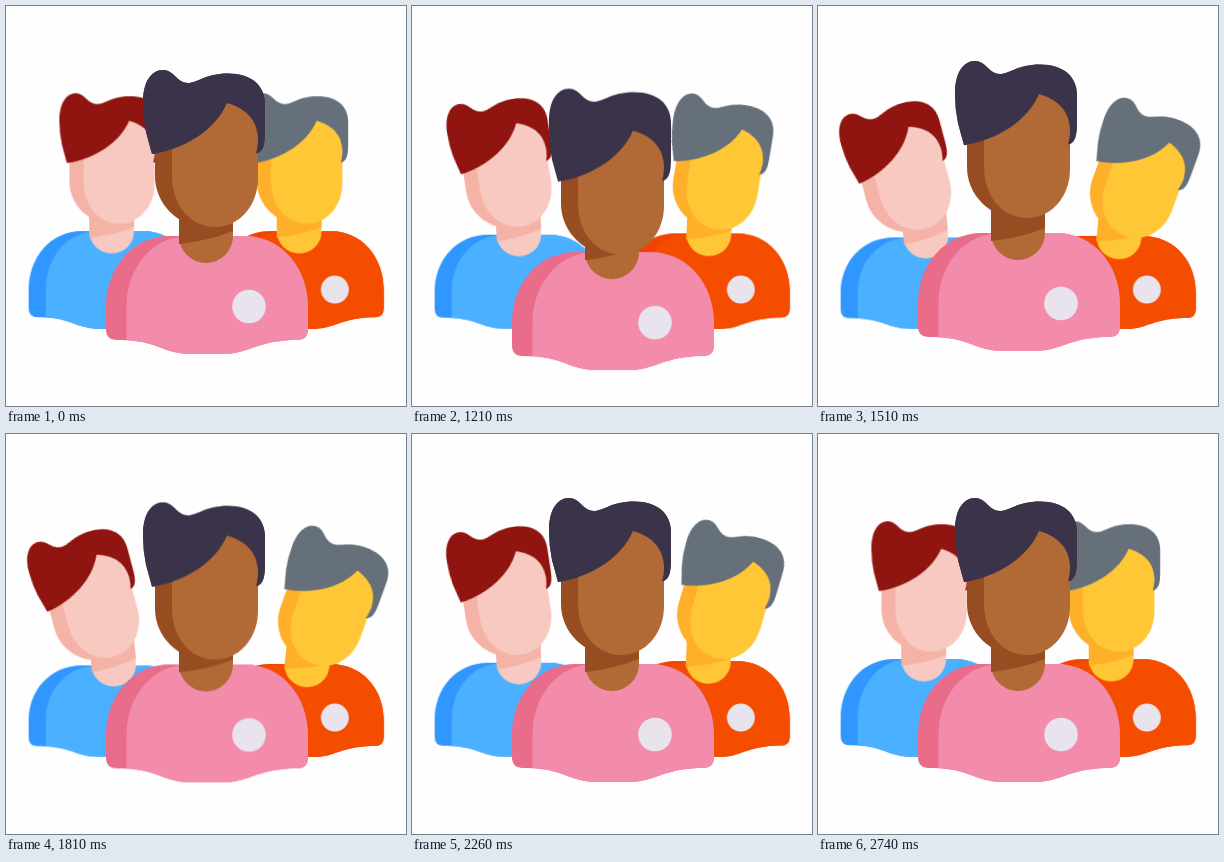
Write an HTML page that moves like this. It is 400 px wide and 400 px high and loops after 2.83 s.

```html
<!DOCTYPE html>
<html lang="en">
<head>
<meta charset="utf-8">
<title>Team</title>
<style>
  html, body { margin: 0; width: 100%; height: 100%; overflow: hidden; background: #fefefe; }
  svg { display: block; width: 100vw; height: 100vh; }

  .left  { --hair: #90140f; --skin: #f8c9c0; --shade: #f4b3a6; --shirt: #4ab0ff; --fold: #2f97ff; }
  .right { --hair: #66707a; --skin: #ffc736; --shade: #ffb02b; --shirt: #f44d00; --fold: #f04400; }
  .front { --hair: #3b3349; --skin: #b16936; --shade: #984c21; --shirt: #f38caa; --fold: #e96c8b; }

  .hair { fill: var(--hair); }
  .skin { fill: var(--skin); }
  .shade { fill: var(--shade); }
  .shirt { fill: var(--shirt); }
  .fold { fill: var(--fold); }
  .badge { fill: #e9e3ee; }

  .move { animation: 2830ms ease-in-out infinite; }
  .sink { transform-origin: 201px 348px; }
  .lean { transform-origin: 200px 230px; }
  .left .sink { animation-name: sink-left; }
  .left .lean { animation-name: lean-left; }
  .left .tilt { animation-name: tilt-left; transform-origin: 229px 250px; }
  .right .sink { animation-name: sink-right; }
  .right .lean { animation-name: lean-right; }
  .right .shift { animation-name: shift-right; }
  .right .tilt { animation-name: tilt-right; transform-origin: 200px 218px; }
  .torso { animation-name: torso; }
  .nod { animation-name: nod; }
  .crown { animation-name: crown; }

  @keyframes sink-left {
    0%, 35.3%, 89%, 100% { transform: scaleY(1); }
    49.1%, 72.4% { transform: scaleY(.935); }
  }
  @keyframes lean-left {
    0%, 35.3%, 89%, 100% { transform: translate(0, 0) rotate(0deg); }
    49.1%, 72.4% { transform: translate(2.5px, 6px) rotate(-5deg); }
  }
  @keyframes tilt-left {
    0%, 35.3%, 89%, 100% { transform: rotate(0deg); }
    49.1%, 72.4% { transform: rotate(-15deg); }
  }
  @keyframes sink-right {
    0%, 35.3%, 87%, 100% { transform: scaleY(1); }
    50.9%, 71% { transform: scaleY(.95); }
  }
  @keyframes lean-right {
    0%, 35.3%, 87%, 100% { transform: translate(0, 0) rotate(0deg); }
    50.9%, 71% { transform: translate(9.5px, 7px) rotate(6deg); }
  }
  @keyframes shift-right {
    0%, 35.3%, 87%, 100% { transform: translate(0, 0); }
    50.9%, 71% { transform: translate(9px, 11.8px); }
  }
  @keyframes tilt-right {
    0%, 35.3%, 92.6%, 100% { transform: rotate(0deg); }
    50.9%, 74.5% { transform: rotate(20deg); }
  }
  @keyframes torso {
    0%, 35% { transform: translateY(0); }
    43.8% { transform: translateY(16.5px); }
    55.1% { transform: translateY(-4px); }
    63.6% { transform: translateY(.4px); }
    73.5%, 100% { transform: translateY(0); }
  }
  @keyframes nod {
    0%, 35.7% { transform: translateY(0); }
    43.8% { transform: translateY(28.5px); }
    56.9% { transform: translateY(-15.5px); }
    63.6% { transform: translateY(4.6px); }
    73.5%, 100% { transform: translateY(0); }
  }
  /* the top of the hair trails behind the nod */
  @keyframes crown {
    0%, 35% { transform: translateY(0); }
    43% { transform: translateY(-9px); }
    53.4%, 100% { transform: translateY(0); }
  }
</style>
</head>
<body>
<svg viewBox="0 0 400 400">
  <defs>
    <g id="body">
      <path class="fold" d="M100 301C100 262 126 230 164 230H238C276 230 302 262 302 301V323Q302 334 291 334C264 334 250 341 240 344Q228 348 218 348H184Q173 348 161 344C150 340 138 334 111 334Q100 334 100 323Z"/>
      <path class="shirt" d="M120.500 334V301C120.500 262 146 230 183 230H238C276 230 302 262 302 301V323Q302 334 291 334C264 334 250 341 240 344Q228 348 218 348H184Q173 348 161 344C150 340 140 335 120.500 334Z"/>
    </g>
    <circle id="badge" class="badge" cx="243" cy="300.500" r="16.800"/>
    <g id="neck">
      <path class="skin" d="M173 185H227V230A27 27 0 0 1 173 230Z"/>
      <path class="shade" d="M173 185H227V225Q202 235 173 238Z"/>
    </g>
    <g id="face">
      <path class="shade" d="M149 110H240V200L209 221H200C172 221 149 198 149 170Z"/>
      <path class="skin" d="M166 95H252V172C252 200 233 221 209 221C185 221 166 200 166 170Z"/>
    </g>
    <path id="hair" class="hair" d="M146 148L140 126Q137 112 137 97C137 76 145 64 157 64C168 64 171 77 182 77C192 77 199 67.500 222 67.500C246 67.500 259 80 259 98V125C259 139 257 146 250 147.500C251.500 142 252 138 252 132C251 112 238 102 221 97C210 123 180 143 146 148Z"/>
    <g id="head">
      <use href="#face"/>
      <use href="#hair"/>
    </g>
  </defs>

  <g class="right" transform="translate(294 323) scale(.83) translate(-201 -348)">
    <use class="move sink" href="#body"/>
    <use href="#badge"/>
    <use class="move lean" href="#neck"/>
    <g class="move shift"><use class="move tilt" href="#head"/></g>
  </g>

  <g class="left" transform="translate(106.500 323) scale(.83) translate(-201 -348)">
    <use class="move sink" href="#body"/>
    <use class="move lean" href="#neck"/>
    <use class="move tilt" href="#head"/>
  </g>

  <g class="front">
    <g class="move torso">
      <use href="#body"/>
      <use href="#badge"/>
      <use href="#neck"/>
    </g>
    <g class="move nod">
      <use class="move crown" href="#hair"/>
      <use href="#head"/>
    </g>
  </g>
</svg>
</body>
</html>
```
